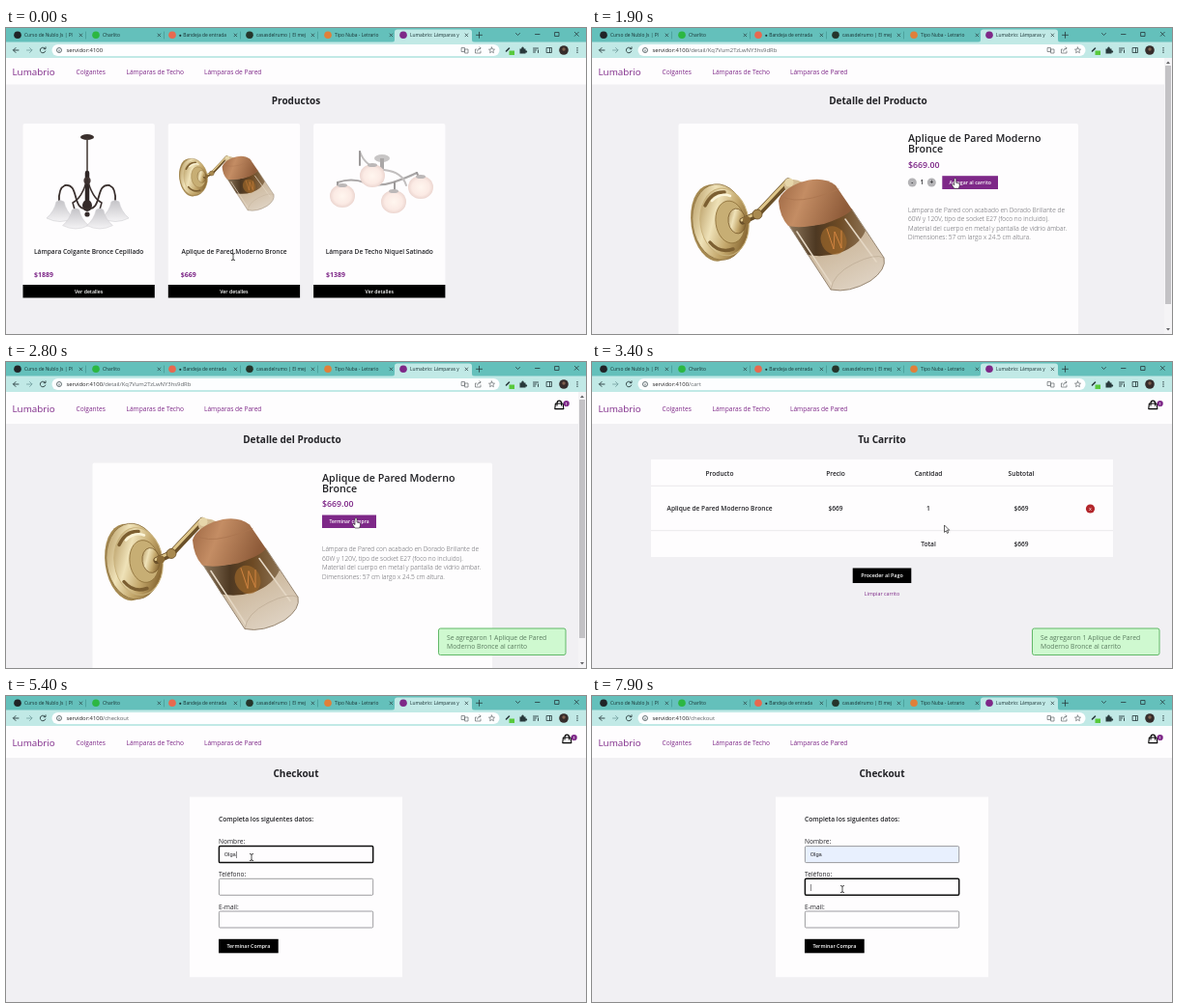
Write an HTML page that moves like this. It is 600 by 317 pixels and loops after 8000 ms.

```html
<!DOCTYPE html>
<html lang="es">
<head>
<meta charset="utf-8">
<title>Tienda de lámparas</title>
<style>
  html, body { margin: 0; width: 100%; height: 100%; overflow: hidden; }
  svg { display: block; width: 100vw; height: 100vh; font-family: "Open Sans", "Noto Sans", sans-serif; }
</style>
</head>
<body>
<svg id="stage" viewBox="0 0 600 317" preserveAspectRatio="none">
  <defs>
    <linearGradient id="gold" y2=".6"><stop stop-color="#a98a50"/><stop offset=".4" stop-color="#efe2b8"/><stop offset=".7" stop-color="#c4a86c"/><stop offset="1" stop-color="#8a6a35"/></linearGradient>
    <linearGradient id="copper" y2=".25"><stop stop-color="#9c6642"/><stop offset=".4" stop-color="#c48d64"/><stop offset="1" stop-color="#8f5c3a"/></linearGradient>
    <linearGradient id="glass" x2=".6" y2="1"><stop stop-color="#a48c6e"/><stop offset=".55" stop-color="#cdb99e"/><stop offset="1" stop-color="#ddd0bf"/></linearGradient>
    <linearGradient id="amber"><stop stop-color="#8d775c"/><stop offset=".35" stop-color="#4d3822"/><stop offset=".65" stop-color="#6d4a24"/><stop offset="1" stop-color="#8b7152"/></linearGradient>
    <linearGradient id="shade" x2="0" y2="1"><stop stop-color="#c4c3c7"/><stop offset="1" stop-color="#f4f3f5"/></linearGradient>
    <radialGradient id="globe"><stop stop-color="#fff6ef"/><stop offset=".7" stop-color="#fbeae4"/><stop offset="1" stop-color="#ecd6d0"/></radialGradient>
  </defs>
  <g id="page"></g>
  <g id="browser"></g>
  <g id="cursor"></g>
</svg>
<script>
const LOOP = 8000;
const PURPLE = '#7e2888', INK = '#222226', BRAND = 'Lumabrio', BUYER = 'Olga';
const ITEM = 'Aplique de Pared Moderno Bronce';
const $ = id => document.getElementById(id);

// ---- drawing helpers ----
const rect = (x, y, w, h, fill, more = '') =>
  `<rect x="${x}" y="${y}" width="${w}" height="${h}" fill="${fill}" ${more}/>`;
const circle = (x, y, r, fill, more = '') =>
  `<circle cx="${x}" cy="${y}" r="${r}" fill="${fill}" ${more}/>`;
const oval = (x, y, rx, ry, turn, fill, more = '') =>
  `<ellipse rx="${rx}" ry="${ry}" transform="translate(${x} ${y}) rotate(${turn})" fill="${fill}" ${more}/>`;
const line = (d, color, width = 1) =>
  `<path d="${d}" fill="none" stroke="${color}" stroke-width="${width}" stroke-linecap="round" stroke-linejoin="round"/>`;
const shape = (d, fill, more = '') => `<path d="${d}" fill="${fill}" ${more}/>`;
const text = (x, y, s, size, fill = INK, weight = 400, more = '') =>
  `<text x="${x}" y="${y}" font-size="${size}" fill="${fill}" font-weight="${weight}" ${more}>${s}</text>`;
const mid = (x, y, s, size, fill, weight) => text(x, y, s, size, fill, weight, 'text-anchor="middle"');
const move = (x, y, s, scale = 1) => `<g transform="translate(${x} ${y}) scale(${scale})">${s}</g>`;
const button = (x, y, w, h, label, hot, size = 5.2) =>
  rect(x, y, w, h, hot ? PURPLE : '#000') + mid(x + w / 2, y + h / 2 + 1.9, label, size, '#fff', 600);

// ---- lamps ----
const wallLamp =
  oval(126, 202, 23.5, 40, -8, '#a68a52') +
  oval(132, 201, 28, 39.5, -8, 'url(#gold)', 'stroke="#8f7341" stroke-width=".8"') +
  oval(137, 201, 25, 35, -8, 'url(#gold)', 'stroke="#c9b27c"') +
  line('M117 184Q124 169 137 170M122 222Q132 234 146 229', '#7c5f31', 3.5) +
  line('M124 179Q133 170 143 174', '#fbf4d8', 2.5) +
  oval(143, 201, 15, 22, -8, '#c7ae74', 'stroke="#8d6f39" stroke-width=".8"') +
  oval(150, 200, 9, 13, -8, 'url(#gold)', 'stroke="#7d5f30" stroke-width=".8"') +
  line('M156 200L171 193L203 159', '#6a5029', 7) +
  line('M155 199L170 192L202 158', '#dfc78b', 3) +
  circle(160, 199, 4, '#8b6b36') + circle(171, 193, 5, '#a98a50', 'stroke="#66491f" stroke-width=".8"') +
  shape('M198 162Q206 153 218 160L222 170L204 178Z', '#d4bd94') + circle(204, 160, 4.5, '#e6d6aa') +
  shape('M203 203Q225 207 240 202Q260 196 268 187L302 238Q305 250 288 262Q266 275 247 271Z', 'url(#glass)') +
  shape('M204 204Q225 207 240 202Q260 196 268 187L283 210Q276 226 256 233Q239 238 223 235Z', 'url(#amber)') +
  oval(250, 220, 13, 15, -28, '#a56d2c', 'opacity=".6"') +
  line('M243 208L250 229L251 211L258 228L258 210', '#d18440', 1) +
  line('M212 211L248 266M262 198L294 242', '#e5d8c5', 1.5) +
  line('M247 271Q249 255 271 244T302 238', '#bfae97', .8) +
  line('M204 205L247 271Q266 275 288 262Q305 250 302 238L269 188', '#8d7b66', .9) +
  shape('M193 179Q196 168 215 160Q238 152 252 163L269 188Q262 196 240 203Q215 208 203 205Q194 195 193 179Z', 'url(#copper)') +
  line('M196 174Q207 181 228 176Q247 171 255 167', '#ab7550', .8);

const bell = (x, y, k) => move(x, y,
  shape('M-4 -9Q0 -12 4 -9Q6 1 14 8Q0 15 -14 8Q-6 1 -4 -9Z', 'url(#shade)', 'stroke="#cfced2" stroke-width=".6"'), k);
const chandelier =
  oval(84, 113, 7, 3, 0, '#3a302d') + line('M84 115V151', '#4a403c', 1.6) +
  line('M84 150V185', '#2f2726', 4.5) + circle(84, 158, 3.6, '#453937') + oval(84, 184, 5, 6, 0, '#352b2a') +
  [-1, 1].map(s =>
    line(`M84 187C${84 + s * 16} 190 ${84 + s * 8} 160 ${84 + s * 23} 163Q${84 + s * 30} 166 ${84 + s * 29} 180`, '#3a302e', 1.8) +
    line(`M84 156Q${84 + s * 5} 176 ${84 + s * 15} 181L${84 + s * 13} 188`, '#3a302e', 1.5)).join('') +
  bell(56, 189, 1) + bell(113, 189, 1) + bell(72, 197, .95) + bell(97, 197, .95) +
  circle(84, 193, 2.6, '#352b2a');

const ceilingLamp =
  oval(389, 135, 8, 4, 0, '#c8c6c6') + rect(387, 135, 4, 12, '#aaa7a7') +
  line('M343 160Q357 155 371 160T400 160T425 150', '#a9a6a6', 2) +
  line('M366 128Q372 145 391 147T414 163', '#c1bebe', 2) +
  line('M366 128V142M343 160V164M425 150L428 157M402 160V171', '#9c9999', 2) +
  [[348, 174], [379, 153], [401, 180], [429, 165]].map(([x, y]) =>
    oval(x, y, 13, 12, 0, 'url(#globe)') + oval(x, y - 11, 5, 2, 0, '#bcb8b8')).join('');

// ---- shared page parts ----
const bag = x => line(`M${x + .4} 43h7.8l.6 5.6h-9zM${x + 2} 45v-2.3q0-2.6 2.3-2.6t2.3 2.6v2.3`, '#000', 1.1) +
  circle(x + 11.7, 43, 3.1, PURPLE) + mid(x + 11.7, 44.5, '1', 4, '#fff', 600);

function frameOf(title, width, cart) {
  const h = cart ? 33 : 27.5, dy = cart ? 2.7 : 0;
  return rect(0, 31, 600, 286, '#f1f0f3') + rect(0, 31, 600, h, '#fefdfe') +
    text(6.5, 49 + dy, BRAND, 9.85, PURPLE) +
    ['Colgantes', 'Lámparas de Techo', 'Lámparas de Pared']
      .map((s, i) => text([72.5, 124.5, 205][i], 47.8 + dy, s, 6.6, PURPLE)).join('') +
    (cart ? bag(width - 24) : '') +
    mid(width / 2, cart ? 84 : 79, title, 10, INK, 700);
}

const toast = width => rect(width - 144.5, 276, 131.5, 27.5, '#cff9d0', 'rx="2" stroke="#62b868"') +
  text(width - 136, 287.8, 'Se agregaron 1 Aplique de Pared', 6.8, '#5b7d60') +
  text(width - 136, 297.3, 'Moderno Bronce al carrito', 6.8, '#5b7d60');

const scrollbar = rect(592, 31, 8, 286, '#f5f4f6') + rect(593, 39, 6, 247, '#c3c2c5') +
  shape('M594 37l2-2.5 2 2.5zM594 311l2 2.5 2-2.5z', '#606064');

// ---- pages ----
function products(hot) {
  const items = [
    ['Lámpara Colgante Bronce Cepillado', '$1889', chandelier],
    [ITEM, '$669', move(129, 56, wallLamp, .49)],
    ['Lámpara De Techo Níquel Satinado', '$1389', ceilingLamp]];
  return frameOf('Productos', 600, false) + items.map(([name, price, lamp], i) => {
    const x = 17.5 + i * 150.3;
    return rect(x, 99, 136.3, 180.5, '#fefdfe', 'rx="2"') + lamp +
      mid(x + 68.2, 234.4, name, 6.6, INK, 600) +
      text(x + 11.5 + (i > 0 ? 1.5 : 0), 257.7, price, 7, PURPLE, 700) +
      button(x, 266, 136.3, 13.5, 'Ver detalles', hot && i === 1);
  }).join('');
}

function detail(hot, bought) {
  const about = [
    'Lámpara de Pared con acabado en Dorado Brillante de',
    '60W y 120V, tipo de socket E27 (foco no incluido).',
    'Material del cuerpo en metal y pantalla de vidrio ámbar.',
    'Dimensiones: 57 cm largo x 24.5 cm altura.'];
  const sign = (x, s) => circle(x, 160, 4.5, '#b4b3b6') + mid(x, 162.2, s, 6.3, INK, 600);
  const buy = bought
    ? button(327, 153, 56, 13.5, 'Terminar compra', hot, 4.95)
    : sign(331.3, '-') + mid(341.3, 162.4, '1', 6.5, INK, 600) + sign(351.3, '+') +
      button(362.3, 153.2, 57.7, 13.8, 'Agregar al carrito', hot);
  return frameOf('Detalle del Producto', 592, bought) + move(0, bought ? 5.5 : 0,
    rect(89.5, 99, 413.5, 230, '#fefdfe', 'rx="2"') + wallLamp +
    text(327, 118, 'Aplique de Pared Moderno', 10.7, INK, 600) +
    text(327, 129.3, 'Bronce', 10.7, INK, 600) +
    text(327, 144.5, '$669.00', 8.8, PURPLE, 600) + buy +
    about.map((s, i) => text(327, 190.8 + i * 9.4, s, 6.58, '#5c5c62', 300)).join('')) +
    scrollbar;
}

function cart(hot) {
  const cells = (y, list) => list.map((s, i) => s && mid([132, 252, 348, 444][i], y, s, 6.6, INK, 600)).join('');
  const rule = y => `<path d="M61 ${y}H539" stroke="#e6e4e8" stroke-width=".8"/>`;
  return frameOf('Tu Carrito', 600, true) +
    rect(61, 101, 478, 101, '#fefdfe') + rule(128.3) + rule(174.7) +
    cells(117.5, ['Producto', 'Precio', 'Cantidad', 'Subtotal']) +
    cells(154.2, [ITEM, '$669', '1', '$669']) +
    cells(190.7, ['', '', 'Total', '$669']) +
    circle(515.5, 152, 4.6, '#b3262b') + mid(515.5, 153.8, 'x', 5.5, '#fff') +
    button(269.7, 213.5, 60.6, 15.5, 'Proceder al Pago', hot, 5.4) +
    mid(300, 242, 'Limpiar carrito', 5.3, PURPLE);
}

function checkout(t) {
  const focus = t < 4720 ? -1 : t < 6700 ? 0 : 1;
  const typed = BUYER.slice(0, Math.max(0, Math.floor((t - 4700) / 150)));
  const since = focus ? t - 6700 : Math.max(0, t - 5300);
  const caret = since % 1060 < 530 ? '<tspan font-size="6.5">|</tspan>' : '';
  return frameOf('Checkout', 600, true) +
    rect(190, 104.5, 220, 186.7, '#fefdfe') +
    text(220, 130.3, 'Completa los siguientes datos:', 6.7, INK, 600) +
    ['Nombre:', 'Teléfono:', 'E-mail:'].map((label, i) => {
      const y = 155.6 + i * 33.7, on = i === focus, filled = !i && t >= 5900;
      return text(220, y - 2.2, label, 6.6) +
        rect(220.4, y, 159.3, 17, filled ? '#e8f0fe' : '#fefdfe',
          `rx="1.2" stroke="${on ? '#101010' : '#858488'}" stroke-width="${on ? 1.5 : .8}"`) +
        text(225.7, y + 10.3, (i ? '' : typed) + (on ? caret : ''), 5.7, INK, 400,
          'font-family="Liberation Sans, Arial, sans-serif"');
    }).join('') +
    button(220, 251.8, 61.7, 14.5, 'Terminar Compra', false, 5.3);
}

// ---- browser window ----
function browser(path) {
  const tabs = [
    [12, '#202326', 'Curso de Nublo Js | Pl'], [93, '#2cb742', 'Charlito'],
    [172, '#e8694f', '● Bandeja de entrada'], [252, '#25352b', 'casasdelrumo | El mej'],
    [333, '#e0803a', 'Tipo Nuba - Letrario'], [411, PURPLE, BRAND + ': Lámparas y']];
  const dark = '#28393b';
  return rect(0, 0, 600, 15, '#64c0bb') +
    shape('M399 15Q402 15 402 12V4Q402 1.5 405 1.5H479Q482 1.5 482 4V12Q482 15 485 15Z', '#c1e9e6') +
    rect(0, 14.5, 600, 16.5, '#c1e9e6') +
    tabs.map(([x, color, s], i) => circle(x, 7.3, 3.8, color) + text(x + 7, 9.3, s, 4.9, '#183133') +
      line(`M${x + 64} 6l2.8 2.8m0-2.8l-2.8 2.8`, dark, .7) +
      (i < 4 ? line(`M${x + 70.5} 4V11`, '#3f8f8c', .6) : '')).join('') +
    line('M486.5 7.3h6m-3-3v6M527.5 5.5l2 2 2-2M547.5 6.5h4.5M568 4.5h4v4h-4zM588.3 4.3l4 4m0-4l-4 4', dark, .8) +
    line('M13 23H7.5l2.5-2.5M7.5 23l2.5 2.5', dark, .9) + line('M21.5 23H27l-2.5-2.5M27 23l-2.5 2.5', '#7aa5a4', .9) +
    line('M40.5 21.4A2.8 2.8 0 1 0 40.8 24M41 19.8v1.9h-1.9', dark, .9) +
    rect(47.5, 17, 463, 12, '#fdfeff', 'rx="6"') +
    circle(55, 23, 2.5, 'none', `stroke="${dark}" stroke-width=".7"`) + line('M55 22.8v1.3', dark, .7) +
    text(62.5, 25.1, `servidor:4100<tspan fill="#5d6265">${path}</tspan>`, 5.9, '#222') +
    line('M471.5 20.5h3v4h-3zM475 22h3v4h-3zM486.5 22h-1v4h5.5v-2M487.5 24q0-3 3.5-3l-1-1.2m1 1.2l-1 1.2', '#62686a', .7) +
    line('M502.5 20l.9 2 2.1.2-1.6 1.4.5 2.1-1.9-1.1-1.9 1.1.5-2.1-1.6-1.4 2.1-.2z', '#62686a', .7) +
    line('M517.5 24l3-3', dark, 1.6) + rect(520.5, 23.5, 5.5, 4.5, '#58c93c') +
    shape('M531.5 21.5h1.7q0-2 1.3-2t1.3 2h1.7v1.7q1.7 0 1.7 1.2t-1.7 1.2v1h-6z', dark) +
    line('M545.5 21h5m-5 2h3m-3 2h2m3-2v2.5', dark, .9) + line('M559.5 20.5h5v5h-5zM562.5 20.5v5', dark, .8) +
    circle(577, 23, 4.8, '#352c2b') + circle(577, 22, 1.7, '#80604f') +
    [20.7, 23, 25.3].map(y => circle(591, y, .7, dark)).join('');
}

// ---- pointer ----
const pointers = {
  arrow: shape('M0 0V7.4L1.8 5.8L3 8.4L4.2 7.8L3 5.2H5.2Z', '#fff', 'stroke="#222" stroke-width=".7"'),
  hand: shape('M-1 -4Q0 -5 1 -4V0L4 .8Q4.8 1.2 4.4 3.6L3.6 6H-1L-3.4 2.6Q-3.4 1.2 -2.2 1.6L-1 2.6Z', '#fff', 'stroke="#222" stroke-width=".6"'),
  beam: line('M-1.6 -3.5Q0 -3.5 0 -2.5Q0 -3.5 1.6 -3.5M0 -2.5V2.8M-1.6 3.6Q0 3.6 0 2.6Q0 3.6 1.6 3.6', '#222', .8)
};
// time, x, y, pointer from then on
const trail = [
  [0, 235, 237, 'beam'], [150, 235, 237, 'arrow'], [350, 236, 271, 'hand'], [560, 236, 272, 'arrow'],
  [780, 333.5, 229, 'arrow'], [1150, 333.5, 229, 'arrow'], [1600, 375, 161, 'hand'], [2050, 376, 160, 'arrow'],
  [2300, 373.5, 155.5, 'arrow'], [2550, 362, 166, 'hand'], [2950, 362, 166, 'arrow'], [3300, 364.5, 169, 'arrow'],
  [3500, 364.5, 169, 'arrow'], [3900, 304, 221, 'hand'], [4200, 304, 221, 'arrow'], [4600, 254, 167, 'beam'],
  [6250, 254, 167, 'beam'], [6600, 259, 200, 'beam'], [LOOP, 259, 200, 'beam']];

function pointerAt(t) {
  const i = trail.findIndex(k => k[0] > t) - 1;
  const [t0, x0, y0, kind] = trail[i], [t1, x1, y1] = trail[i + 1];
  const p = (t - t0) / (t1 - t0), e = p * p * (3 - 2 * p);
  return { x: x0 + (x1 - x0) * e, y: y0 + (y1 - y0) * e, kind };
}

// ---- playback ----
const shown = {};
function put(id, markup) {
  if (shown[id] !== markup) $(id).innerHTML = shown[id] = markup;
}

function draw(now) {
  const t = now % LOOP, p = pointerAt(t), hot = p.kind === 'hand';
  let path, page;
  if (t < 600) [path, page] = ['', products(hot)];
  else if (t < 3000) [path, page] = ['/detail/Kq7Vum2TzLwNY3hs9dRb', detail(hot, t >= 2080)];
  else if (t < 4250) [path, page] = ['/cart', cart(hot)];
  else [path, page] = ['/checkout', checkout(t)];
  if (t >= 2150 && t < 4350) page += toast(t < 3000 ? 592 : 600);
  put('page', page);
  put('browser', browser(path));
  put('cursor', pointers[p.kind]);
  $('cursor').setAttribute('transform', `translate(${p.x} ${p.y})`);
}

const start = performance.now();
function tick() {
  draw(performance.now() - start);
  requestAnimationFrame(tick);
}
tick();
</script>
</body>
</html>
```
